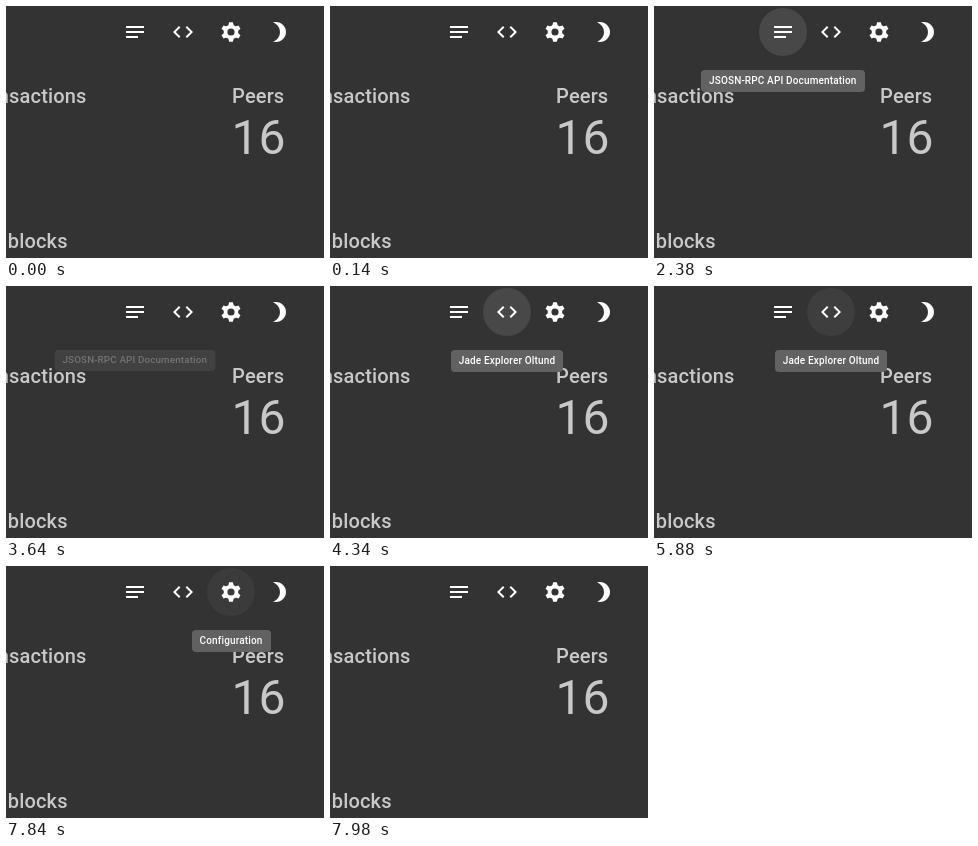
An HTML page for the animation above (8000 ms loop, 318 by 252 pixels).

```html
<!DOCTYPE html>
<html lang="en">
<head>
<meta charset="utf-8">
<title>Toolbar tooltips</title>
<style>
html, body { margin: 0; width: 100%; height: 100%; overflow: hidden; background: #333; }
#stage { position: relative; width: 318px; height: 252px; overflow: hidden; font-family: Roboto, Arial, sans-serif; }
svg { position: absolute; left: 0; top: 0; }
.label { font: 500 20px Roboto, Arial, sans-serif; letter-spacing: .15px; }
.count { font: 400 48px Roboto, Arial, sans-serif; }
.anchor { position: absolute; top: 64px; width: 0; display: flex; justify-content: center; }
.tip {
  flex: none; padding: 4px 8px; border-radius: 4px; background: #626262; color: #fff;
  font-size: 10px; font-weight: 500; line-height: 14px; letter-spacing: .15px;
  white-space: nowrap; transform-origin: center top; opacity: 0;
}
</style>
</head>
<body>
<div id="stage">
  <svg width="318" height="252">
    <g id="halos" fill="#484848"></g>
    <g fill="#fff">
      <path transform="translate(117 14)" d="M3 18h12v-2H3zM3 6v2h18V6zM3 13h18v-2H3z"/>
      <path transform="translate(165 14)" d="M9.4 16.6L4.8 12l4.6-4.6L8 6l-6 6 6 6zM14.6 16.6l4.6-4.6-4.6-4.6L16 6l6 6-6 6z"/>
      <g id="gear" transform="translate(225 26)">
        <circle r="5.45" fill="none" stroke="#fff" stroke-width="3.7"/>
      </g>
      <path transform="translate(261 14)" d="M9 2c-1.05 0-2.05.16-3 .46 4.06 1.27 7 5.06 7 9.54s-2.94 8.27-7 9.54c.95.3 1.95.46 3 .46 5.52 0 10-4.48 10-10S14.52 2 9 2z"/>
    </g>
    <g fill="#c8c8c8">
      <text class="label" x="80.5" y="97" text-anchor="end">Transactions</text>
      <text class="label" x="61.7" y="242" text-anchor="end">Latest blocks</text>
      <text class="label" x="252.2" y="97" text-anchor="middle">Peers</text>
      <text class="count" x="252.5" y="148" text-anchor="middle">16</text>
    </g>
  </svg>
</div>
<script>
const LOOP = 8000, STEP = 70, GROW = 174, FADE = 150;
const ENTER_DELAY = 100, LEAVE_DELAY = 45;
const NS = "http://www.w3.org/2000/svg";

// Times at which each tooltip starts to open and to close
const buttons = [
  { x: 129, text: "JSOSN-RPC API Documentation", open: 2182, close: 3563, haloIn: 2080 },
  { x: 177, text: "Jade Explorer Oltund", open: 4175, close: 5875 },
  { x: 225, text: "Configuration", open: 6060, close: 7825 }
];

const clamp = v => Math.min(1, Math.max(0, v));

// Standard easing: cubic-bezier(.4, 0, .2, 1)
function ease(x) {
  x = clamp(x);
  if (x === 0 || x === 1) return x;
  let lo = 0, hi = 1, u;
  for (let i = 0; i < 24; i++) {
    u = (lo + hi) / 2;
    const bx = 1.2 * u * (1 - u) ** 2 + .6 * u * u * (1 - u) + u ** 3;
    if (bx < x) lo = u; else hi = u;
  }
  return 3 * u * u * (1 - u) + u ** 3;
}

function addSvg(parent, tag, attrs) {
  const el = document.createElementNS(NS, tag);
  for (const key in attrs) el.setAttribute(key, attrs[key]);
  return parent.appendChild(el);
}

for (let a = 0; a < 360; a += 60)
  addSvg(gear, "path", { d: "M-1.9-9.8h3.8l.9 4h-5.6z", transform: `rotate(${a})` });

for (const b of buttons) {
  b.halo = addSvg(halos, "circle", { cx: b.x, cy: 26, r: 24, opacity: 0 });
  const anchor = document.createElement("div");
  anchor.className = "anchor";
  anchor.style.left = b.x + "px";
  b.tip = document.createElement("div");
  b.tip.className = "tip";
  b.tip.textContent = b.text;
  anchor.append(b.tip);
  stage.append(anchor);
}

function draw(t) {
  for (const b of buttons) {
    const hover = b.open - ENTER_DELAY, leave = b.close - LEAVE_DELAY;
    // The first halo shows up at once, together with its tooltip
    const shown = b.haloIn ? +(t > b.open) : ease((t - hover) / FADE);
    b.halo.setAttribute("opacity", shown - ease((t - leave) / FADE) * shown);

    const opening = (t - b.open) / GROW, closing = (t - b.close) / GROW;
    const size = ease(opening * 1.5) - ease((closing - 1 / 3) * 1.5);
    const scale = .75 + .25 * size;
    b.tip.style.opacity = ease(opening) - ease(closing);
    b.tip.style.transform = `scale(${scale}, ${scale * scale})`;
  }
}

const start = performance.now();
function tick() {
  const t = (performance.now() - start) % LOOP;
  draw(Math.floor(t / STEP) * STEP);
  requestAnimationFrame(tick);
}
tick();
</script>
</body>
</html>
```
